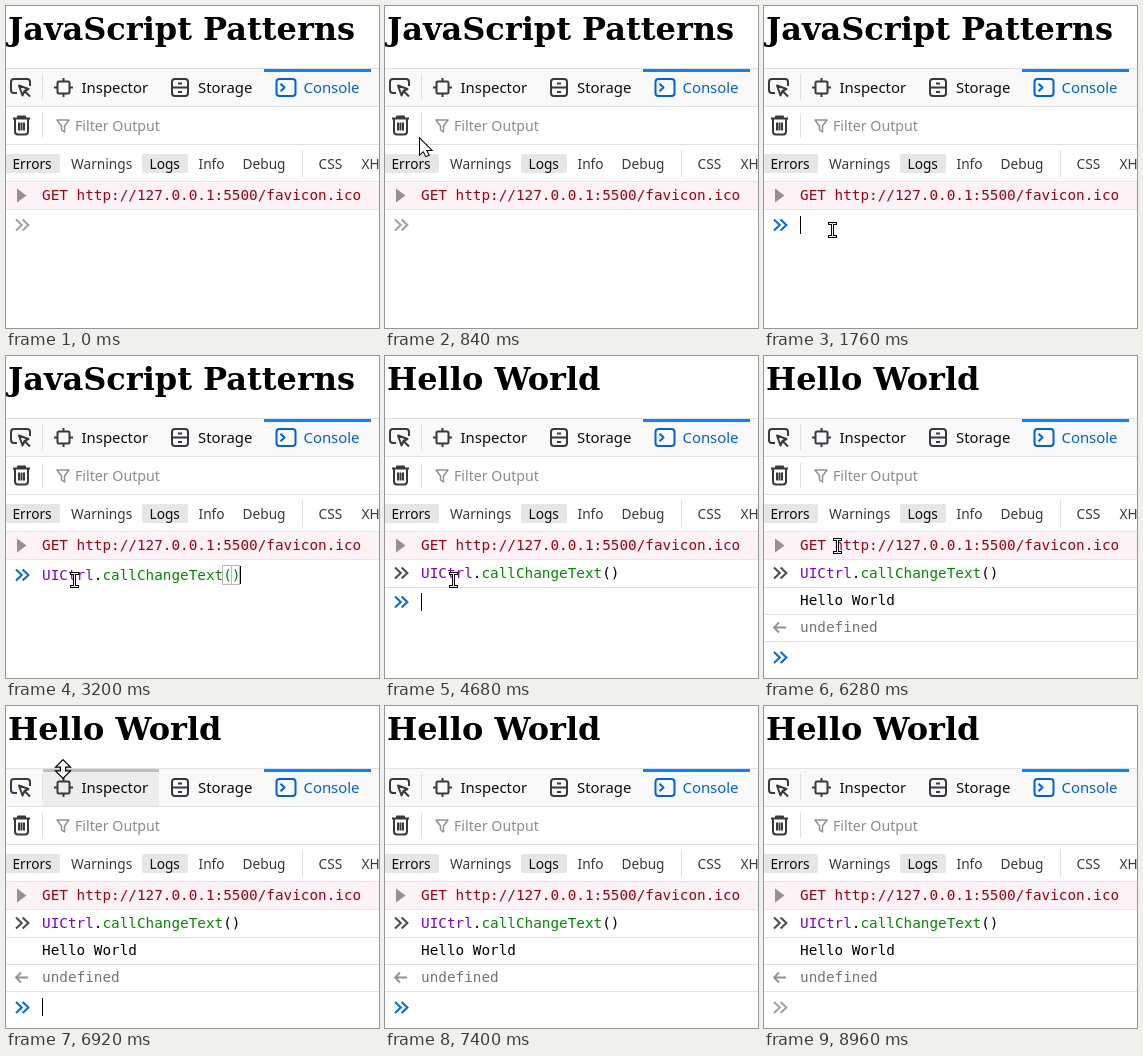
These frames come from a looping animation (373x322 px, 9.16 s). An HTML page:

```html
<!DOCTYPE html>
<html lang="en">
<head>
<meta charset="utf-8">
<title>Console demo</title>
<style>
html, body { margin: 0; width: 100%; height: 100%; overflow: hidden; background: #fff; }
svg { display: block; width: 373px; height: 322px; }
text { white-space: pre; }
.head { font: bold 32px "DejaVu Serif", "Noto Serif", serif; }
.tab { font: 14.9px "Noto Sans", sans-serif; fill: #0c0c0d; }
.chip { font: 13.7px "Noto Sans", sans-serif; fill: #38383d; }
.on { fill: #0c0c0d; }
.code { font: 14.33px "DejaVu Sans Mono", monospace; }
.icon { fill: none; stroke: #38383d; stroke-width: 2; stroke-linejoin: round; }
.line { fill: #e0e0e2; }
.obj { fill: #8000d7; }
.call { fill: #058b00; }
#pointer { fill: #fff; stroke: #000; stroke-width: 2; paint-order: stroke; }
</style>
</head>
<body>
<svg viewBox="0 0 373 322">
  <defs>
    <path id="chevron" d="M1 1l5.800 5.500-5.800 5.500M7.600 1l5.800 5.500-5.800 5.500" fill="none" stroke="currentColor" stroke-width="2"/>
  </defs>
  <text id="title" class="head" x="2" y="34"></text>

  <!-- tab bar -->
  <path fill="#f9f9fa" d="M0 62h373v38H0z"/>
  <path class="line" d="M0 62h373v1H0zM0 100h373v1H0zM36 68h1v26h-1z"/>
  <g id="hover"><path fill="#ededee" d="M37 63h116v37H37z"/><path fill="#bebebf" d="M37 63h116v3H37z"/></g>
  <path fill="#0a84ff" d="M258 63h107v3H258z"/>
  <path class="icon" d="M11 87H8q-3 0-3-3v-8q0-3 3-3h13q3 0 3 3v4"/>
  <path class="icon" d="M13 79.500l3.500 10 2-4.500 4-2zM18 84.500l6 6"/>
  <path class="icon" d="M53 75.500h9q1.500 0 1.500 1.500v9q0 1.500-1.500 1.500h-9q-1.500 0-1.500-1.500v-9q0-1.500 1.500-1.500zM57.500 72v3M57.500 88v3M48 81.500h3M64 81.500h3"/>
  <path class="icon" d="M169 73h10q3 0 3 3v11q0 3-3 3h-10q-3 0-3-3V76q0-3 3-3zM166 81.500h16M172 77.500h4M172 86h4"/>
  <path class="icon" style="stroke:#0060df" d="M273.500 73h13q3 0 3 3v11q0 3-3 3h-13q-3 0-3-3V76q0-3 3-3zM274.500 77.800l4 3.700-4 3.700"/>
  <text class="tab" x="75.500" y="87">Inspector</text>
  <text class="tab" x="192" y="87">Storage</text>
  <text class="tab" x="297.500" y="87" style="fill:#0060df">Console</text>

  <!-- filter rows -->
  <path class="line" d="M0 138h373v1H0zM36 107h1v25h-1zM296 144h1v27h-1z"/>
  <path class="icon" d="M7 112.500h17M12 112.500v-2h7v2M9 113.500v12q0 3 3 3h7q3 0 3-3v-12M13 116.500v8M15.500 116.500v8M18 116.500v8"/>
  <path class="icon" style="stroke:#919196;stroke-width:1.5" d="M51 114h12l-4.500 6v6l-3-2v-4z"/>
  <text x="69" y="125" style="font:14.2px 'Noto Sans',sans-serif;fill:#8b8b8f">Filter Output</text>
  <rect x="-2" y="148" width="56" height="19" rx="2" fill="#e6e6e6"/>
  <rect x="136" y="148" width="46" height="19" rx="2" fill="#e6e6e6"/>
  <text class="chip on" x="6.500" y="163">Errors</text>
  <text class="chip" x="65" y="163">Warnings</text>
  <text class="chip on" x="143.500" y="163">Logs</text>
  <text class="chip" x="192.500" y="163">Info</text>
  <text class="chip" x="236.500" y="163">Debug</text>
  <text class="chip" x="312.500" y="163">CSS</text>
  <text class="chip" x="355.500" y="163">XHR</text>

  <!-- console output -->
  <path fill="#fdf2f5" d="M0 175h373v29H0z"/>
  <path fill="#f3dfe4" d="M0 175h373v1H0zM0 203h373v1H0z"/>
  <path fill="#919196" d="M11 182.500l9.500 7-9.500 7z"/>
  <text class="code" x="36" y="194" fill="#a4000f">GET http://127.0.0.1:5500/favicon.ico</text>
  <g id="typed">
    <path fill="none" stroke="#b8b8b8" d="M216.500 209.500h9v19h-9zM225.500 209.500h8v19h-8z"/>
    <text class="code" x="36" y="224"><tspan class="obj">UICtrl</tspan>.<tspan class="call">callChangeText()</tspan></text>
  </g>
  <g id="echo">
    <use href="#chevron" x="9" y="210.500" color="#4a4a4f"/>
    <text class="code" x="36" y="222"><tspan class="obj">UICtrl</tspan>.<tspan class="call">callChangeText</tspan>()</text>
    <path class="line" d="M0 231h373v1H0z"/>
  </g>
  <g id="log">
    <text class="code" x="36" y="249">Hello World</text>
    <path class="line" d="M0 258h373v1H0z"/>
  </g>
  <g id="result">
    <path class="icon" style="stroke:#919196;stroke-width:1.800" d="M22 271.500H10M15 266.500l-5 5 5 5"/>
    <text class="code" x="36" y="276" fill="#737373">undefined</text>
    <path class="line" d="M0 285h373v1H0z"/>
  </g>
  <use id="prompt" href="#chevron" x="9"/>
  <rect id="caret" width="1" height="18"/>

  <!-- pointers, drawn around their hot spot -->
  <g id="pointer">
    <path id="beam" d="M-4-7h3l.5.5.5-.5h3v1H0V6h3v1H0l-.5-.5-.5.5h-3V6h3V-6h-3z"/>
    <path id="arrow" d="M0 0v15l3.500-3 2.500 5 2.500-1-2.500-5h5z"/>
    <path id="resize" stroke-width="2.400" d="M0-8.500L6-2.500H2v5h4L0 8.500-6 2.500h4v-5h-4z"/>
  </g>
</svg>
<script>
const LOOP = 9160, STEP = 40;
const $ = id => document.getElementById(id);
const show = (id, on) => $(id).style.display = on ? "" : "none";

// pointer stops: time, x, y
const stops = [
  [480, 11, 17], [720, 16, 85], [1000, 61, 197], [1200, 61, 198], [1400, 69, 224],
  [5800, 69, 224], [6240, 74, 190], [6440, 74, 190], [6920, 57, 63], [7160, 44, 8],
  [7320, 44, 8], [7400, 41, -6]
];
const blinks = [1760, 2280, 2800, 3720, 4240, 5200, 5760, 6280, 6800, 7320, 7880, 8400];

function pointerAt(t) {
  const i = Math.max(1, stops.findIndex(s => s[0] >= t));
  const [t0, x0, y0] = stops[i - 1], [t1, x1, y1] = stops[i];
  const k = (t - t0) / (t1 - t0);
  return [x0 + (x1 - x0) * k, y0 + (y1 - y0) * k];
}

function drawPointer(t) {
  const visible = t >= 480 && t < 7400;
  show("pointer", visible);
  show("hover", t >= 6760 && t < 6960);
  if (!visible) return;
  const [x, y] = pointerAt(t).map(Math.round);
  const onEdge = y > 58 && y < 67;
  const onText = y < 44 || y > 176;
  $("pointer").setAttribute("transform", `translate(${x} ${y})`);
  show("resize", onEdge);
  show("beam", onText);
  show("arrow", !onEdge && !onText);
}

function draw(t) {
  const typed = t >= 3200 && t < 4640;
  const focused = t >= 1760 && t < 8960;
  $("title").textContent = t < 4680 ? "JavaScript Patterns" : "Hello World";
  show("typed", typed);
  show("echo", t >= 4640);
  show("log", t >= 4720);
  show("result", t >= 4840);

  const y = t < 4640 ? 219 : t < 4720 ? 246 : t < 4840 ? 273 : 301.5;
  $("prompt").setAttribute("y", y - 6.5);
  $("prompt").setAttribute("color", focused ? "#0068e0" : "#a0a0a5");
  $("caret").setAttribute("x", typed ? 234 : 36);
  $("caret").setAttribute("y", Math.floor(y) - 9);
  show("caret", blinks.filter(b => b <= t).length % 2);
  drawPointer(t);
}

function frame(now) {
  draw(Math.floor(now % LOOP / STEP) * STEP);
  requestAnimationFrame(frame);
}
draw(0);
requestAnimationFrame(frame);
</script>
</body>
</html>
```
